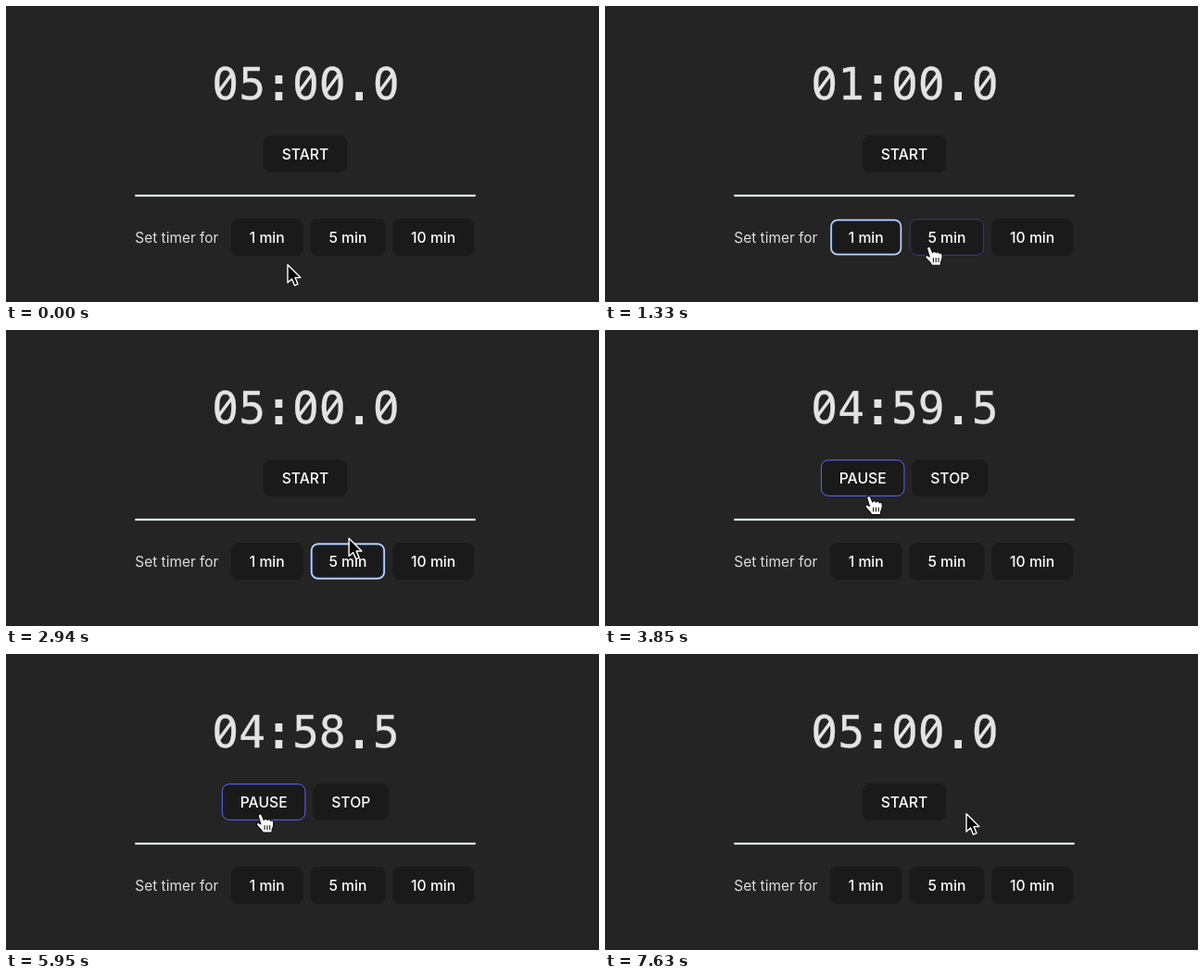
Write an HTML page that moves like this. It is 640x320 px and loops after 8190 ms.

```html
<!DOCTYPE html>
<html lang="en">
<head>
<meta charset="utf-8">
<title>Timer</title>
<style>
  html, body { margin: 0; width: 100%; height: 100%; overflow: hidden; background: #242424; }
  svg { display: block; width: 640px; height: 320px; }
  text { font: 500 15.7px Inter, sans-serif; fill: #fff; text-anchor: middle; }
  .label { font-weight: 400; font-size: 15.45px; fill: #dedede; text-anchor: start; }
  .digit { font: 48px "DejaVu Sans Mono", monospace; fill: #e3e3e3; stroke: #e3e3e3; stroke-width: .3; }
  .dot { stroke-width: 1.8; }
  .slash { stroke: #e3e3e3; stroke-width: 3.6; }
  .face { fill: #1a1a1a; }
  .edge { fill: none; stroke: #646cff; }
  .ring { fill: none; stroke: #bcd5f8; stroke-width: 1.7; }
  .glow { fill: none; stroke: #17305c; }
</style>
</head>
<body>
<svg viewBox="0 0 640 320">
  <rect width="640" height="320" fill="#242424"/>
  <g id="clock"></g>
  <rect x="139.3" y="203.9" width="367.4" height="2.2" fill="#e9f3ec"/>
  <text class="label" x="139.3" y="256">Set timer for</text>
  <g id="buttons"></g>
  <path id="arrow" d="M0 .8V20L4.5 16L7.6 23.2L11 21.7L8 14.6H13.8Z" fill="#000" stroke="#fff" stroke-width="1.4" stroke-linejoin="round"/>
  <g id="hand" stroke-linejoin="round" stroke-linecap="round">
    <path d="M-3.2 3C-3.6 .2 -.2 -.4 .7 2.1L2.8 7C3.2 5.3 6 5.1 6.6 7.1C7.4 5.6 9.8 5.9 10.2 7.8C11.2 6.8 13.1 7.5 13.2 9.4C13.8 13.4 12.6 15.4 11.6 17.4V20.6H1.8C.8 17.4 -3 15.4 -4.8 12.4C-5.8 10.2 -3.2 9.2 -1.4 10.8L-.6 11.4Z" fill="#fff" stroke="#111" stroke-width="1.2"/>
    <path d="M3.6 13V17M6.4 13V17M9.2 13V17" fill="none" stroke="#111" stroke-width="1.1"/>
  </g>
</svg>
<script>
const LOOP = 8190, STEP = 70, TICK = 105, FADE = 300;
const START = 3325, PAUSE = 4790, RESUME = 5705, STOP = 7420;
const $ = id => document.getElementById(id);

function add(parent, tag, attrs, content = '') {
  const el = document.createElementNS('http://www.w3.org/2000/svg', tag);
  for (const k in attrs) el.setAttribute(k, attrs[k]);
  el.textContent = content;
  parent.append(el);
  return el;
}

// Timer state

const presets = [{ at: 0, min: 5 }, { at: 700, min: 1 }, { at: 1470, min: 5 },
  { at: 2100, min: 10 }, { at: 2660, min: 5 }];
const preset = t => presets.findLast(p => p.at <= t);

function mode(t) {
  if (t < START || t >= STOP) return 'idle';
  return t >= PAUSE && t < RESUME ? 'paused' : 'running';
}

function tenths(t) {
  const ticks = (from, to) => Math.floor(Math.max(0, Math.min(t, to) - from) / TICK);
  const gone = t < STOP ? ticks(START, PAUSE) + ticks(RESUME, STOP) : 0;
  return preset(t).min * 600 - gone;
}

function format(n) {
  const two = v => String(v).padStart(2, '0');
  return `${two(Math.floor(n / 600))}:${two(Math.floor(n / 10) % 60)}.${n % 10}`;
}

function focused(b, t) {
  const p = preset(t);
  return p.at > 0 && t < START && b.label === `${p.min} min`;
}

// Buttons: each row is centred and sized by its labels

const PAD = 20, GAP = 7.7, HEIGHT = 40;

function makeRow(center, y, state, labels) {
  const row = labels.map(label => {
    const g = add($('buttons'), 'g', {});
    const text = add(g, 'text', { y: y + 26 }, label);
    return { g, text, label, state, y, w: text.getComputedTextLength() + 2 * PAD };
  });
  let x = center - (row.reduce((sum, b) => sum + b.w + GAP, -GAP)) / 2;
  for (const b of row) {
    const box = (cls, d, rx) => add(b.g, 'rect',
      { class: cls, x: b.x + d, y: y + d, width: b.w - 2 * d, height: HEIGHT - 2 * d, rx });
    b.x = x;
    box('face', 0, 8);
    b.edge = box('edge', .7, 7.5);
    b.ring = add(b.g, 'g', {});
    b.ring.append(box('glow', 2.6, 6), box('ring', 1.3, 7));
    b.text.setAttribute('x', x + b.w / 2);
    b.g.append(b.text);
    x += b.w + GAP;
  }
  return row;
}

const buttons = [
  ...makeRow(374, 230, '', ['1 min', '5 min', '10 min']),
  ...makeRow(323, 140, 'idle', ['START']),
  ...makeRow(323, 140, 'running', ['PAUSE', 'STOP']),
  ...makeRow(323, 140, 'paused', ['CONTINUE', 'STOP'])
];
const shown = (b, t) => !b.state || b.state === mode(t);

// Pointer: eased moves, some bowed downwards

const moves = [
  { at: 0, ms: 420, x: 263, y: 259 },
  { at: 770, ms: 700, x: 361, y: 254, bow: 16 },
  { at: 1540, ms: 490, x: 452, y: 257, bow: 15 },
  { at: 2170, ms: 420, x: 383, y: 253, bow: 15 },
  { at: 2870, ms: 185, x: 343, y: 164 },
  { at: 3500, ms: 350, x: 286, y: 179 },
  { at: 3850, ms: 630, x: 275.5, y: 172.5 },
  { at: 6510, ms: 770, x: 402, y: 177 },
  { at: STOP, ms: 210, x: 390, y: 172, bow: 14 }
];
const ease = u => u * u * (3 - 2 * u);

function pointer(t) {
  let x = 304, y = 279;
  for (const m of moves) {
    if (t < m.at) break;
    const u = ease(Math.min(1, (t - m.at) / m.ms));
    x += (m.x - x) * u;
    y += (m.y - y) * u + (m.bow || 0) * Math.sin(Math.PI * u);
  }
  return [x, y];
}

function hovered(b, t) {
  const [x, y] = pointer(t);
  return shown(b, t) && x > b.x && x < b.x + b.w && y > b.y && y < b.y + HEIGHT;
}

// Border strength at every step of the loop
for (const b of buttons) {
  b.levels = [];
  for (let t = 0, level = 0; t < LOOP; t += STEP) {
    level += (hovered(b, t) ? STEP : -STEP) / FADE;
    level = shown(b, t) ? Math.min(1, Math.max(0, level)) : 0;
    b.levels.push(ease(level));
  }
}

// Clock face

const digits = [...'05:00.0'].map((c, i) => {
  const x = 236.7 + i * 28.9;
  const text = add($('clock'), 'text', { class: /\d/.test(c) ? 'digit' : 'digit dot', x, y: 100.6 }, c);
  const zero = add($('clock'), 'g', {});
  add(zero, 'ellipse', { cx: x, cy: 83, rx: 5.2, ry: 11, fill: '#242424' });
  add(zero, 'path', { class: 'slash', d: `M${x - 7} 92.5L${x + 7} 73.5` });
  return { text, zero };
});

const show = (el, on) => el.style.display = on ? '' : 'none';

function draw(now) {
  const step = Math.floor(now % LOOP / STEP), t = step * STEP;
  for (const b of buttons) {
    show(b.g, shown(b, t));
    show(b.ring, focused(b, t));
    b.edge.style.opacity = b.levels[step];
  }
  [...format(tenths(t))].forEach((c, i) => {
    digits[i].text.textContent = c;
    show(digits[i].zero, c === '0');
  });
  const [x, y] = pointer(t), over = buttons.some(b => hovered(b, t));
  for (const id of ['arrow', 'hand']) {
    $(id).setAttribute('transform', `translate(${x} ${y})`);
    show($(id), over === (id === 'hand'));
  }
}

const origin = performance.now();
function frame() {
  draw(performance.now() - origin);
  requestAnimationFrame(frame);
}
frame();
</script>
</body>
</html>
```
